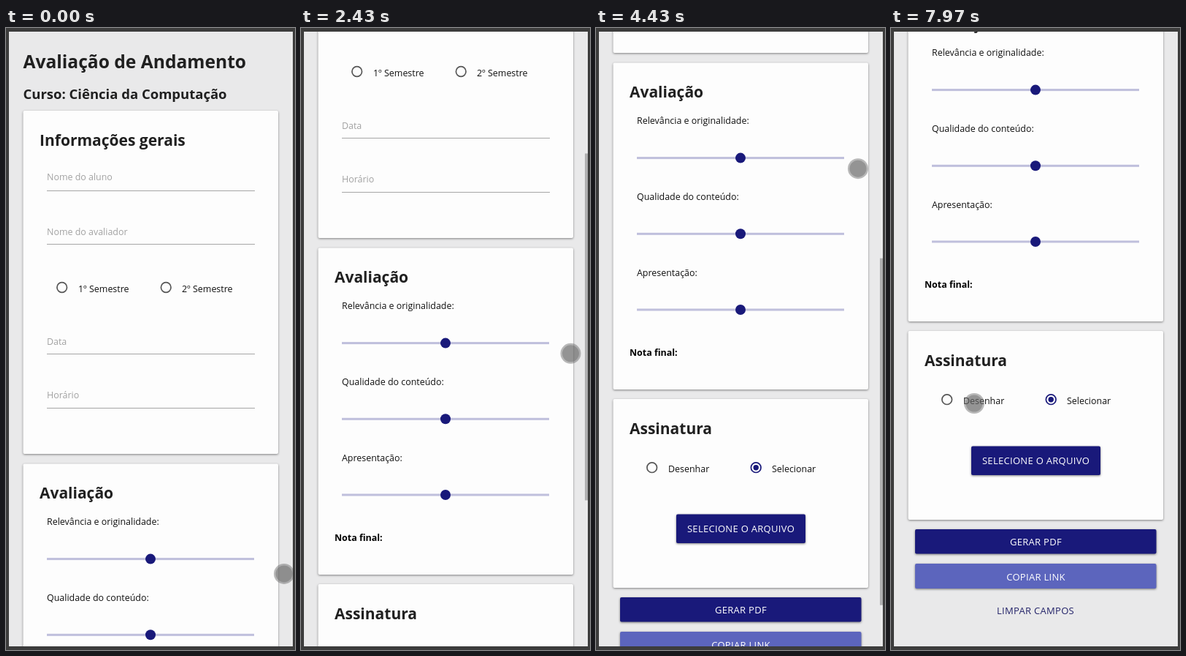
These frames come from a looping animation (396x850 px, 8000 ms). An HTML page:

```html
<!DOCTYPE html>
<html lang="pt-BR">
<head>
<meta charset="utf-8">
<title>Avaliação de Andamento</title>
<style>
  html, body { margin: 0; width: 100%; height: 100%; overflow: hidden; background: #e9e9ea; }
  svg { display: block; width: 100%; height: 100%; }
  text { font: 12.45px "Open Sans", "Noto Sans", sans-serif; fill: #111; }
  .title, .course, .heading, .strong { font-weight: 700; fill: #202020; }
  .title { font-size: 24.6px; }
  .course { font-size: 18.5px; }
  .heading { font-size: 21px; }
  .strong { fill: #000; }
  .hint { fill: #a2a2a2; }
  .caps { font-size: 13px; fill: #fff; letter-spacing: .3px; text-anchor: middle; }
  .flat { fill: #24246a; }
  .card { fill: #fdfdfd; filter: drop-shadow(0 1px 1.5px rgba(0, 0, 0, .45)); }
  .button { fill: #19197a; filter: drop-shadow(0 1px 1.5px rgba(0, 0, 0, .5)); }
  .soft { fill: #5c65bd; }
  .underline { stroke: #a6a6a6; fill: none; }
  .radio { fill: none; stroke: #575757; stroke-width: 1.7; }
  .on { stroke: #19197a; }
  .navy { fill: #19197a; }
</style>
</head>
<body>
<svg viewBox="0 0 396 850">
  <defs>
    <g id="slider">
      <rect x="56" y="-1.5" width="284" height="3" fill="#bfbfdc"/>
      <circle class="navy" cx="198" r="7"/>
    </g>
  </defs>
  <rect width="396" height="850" fill="#e9e9ea"/>

  <g id="page">
    <text class="title" x="23.5" y="55">Avaliação de Andamento</text>
    <text class="course" x="23.5" y="97">Curso: Ciência da Computação</text>

    <rect class="card" x="23.5" y="113" width="349.5" height="469" rx="2"/>
    <text class="heading" x="46" y="161">Informações gerais</text>
    <text class="hint" x="56" y="208">Nome do aluno</text>
    <text class="hint" x="56" y="283">Nome do avaliador</text>
    <text class="hint" x="56" y="433">Data</text>
    <text class="hint" x="56" y="506">Horário</text>
    <path class="underline" d="M56 222.5h285M56 295.5h285M56 445.5h285M56 519.5h285"/>
    <circle class="radio" cx="76.7" cy="354.5" r="6.8"/>
    <text x="99" y="361">1º Semestre</text>
    <circle class="radio" cx="219.2" cy="354.5" r="6.8"/>
    <text x="241" y="361">2º Semestre</text>

    <rect class="card" x="23.5" y="595.5" width="349.5" height="446.5" rx="2"/>
    <text class="heading" x="46" y="643">Avaliação</text>
    <text x="56" y="679">Relevância e originalidade:</text>
    <use href="#slider" y="725.6"/>
    <text x="56" y="783">Qualidade do conteúdo:</text>
    <use href="#slider" y="829.3"/>
    <text x="56" y="887">Apresentação:</text>
    <use href="#slider" y="933"/>
    <text class="strong" x="46" y="996">Nota final:</text>

    <rect class="card" x="23.5" y="1055" width="349.5" height="258" rx="2"/>
    <text class="heading" x="46" y="1103">Assinatura</text>
    <circle class="radio" cx="76.7" cy="1148.7" r="6.8"/>
    <text x="99" y="1155">Desenhar</text>
    <circle class="radio on" cx="219.2" cy="1148.7" r="6.8"/>
    <circle class="navy" cx="219.2" cy="1148.7" r="3.7"/>
    <text x="241" y="1155">Selecionar</text>
    <rect class="button" x="110" y="1212.5" width="177" height="39.5" rx="2"/>
    <text class="caps" x="198.5" y="1237">SELECIONE O ARQUIVO</text>

    <rect class="button" x="33" y="1326" width="330.5" height="33.5" rx="2"/>
    <text class="caps" x="198.5" y="1348">GERAR PDF</text>
    <rect class="button soft" x="33" y="1373" width="330.5" height="34" rx="2"/>
    <text class="caps" x="198.5" y="1396">COPIAR LINK</text>
    <text class="caps flat" x="198" y="1442">LIMPAR CAMPOS</text>
  </g>

  <rect id="bar" x="389" width="4" height="474" fill="#585858" fill-opacity=".4"/>
  <g id="touch">
    <circle r="14" fill="#6c6c6c" fill-opacity=".48"/>
    <circle r="11.5" fill="#5e5e5e" fill-opacity=".4"/>
  </g>
  <path d="M0 0H396V850H0ZM4 5V845H393V5Z" fill="#3c3c3c" fill-rule="evenodd"/>
</svg>
<script>
  const LOOP = 8000, MAX_SCROLL = 641, DRAG_START = 740;
  const DRAG_END = 5400, MOVE_START = 6650;
  // time, x, y of the touch point
  const path = [
    [0, 381, 746], [1730, 374, 537], [3130, 365, 353], [3970, 359, 245],
    [4930, 359, 135], [DRAG_END, 359, 82], [MOVE_START, 359, 82], [7500, 114, 513], [LOOP, 114, 513]
  ];
  const page = document.getElementById('page');
  const bar = document.getElementById('bar');
  const touch = document.getElementById('touch');
  const clamp = (v, lo, hi) => Math.min(hi, Math.max(lo, v));

  function touchAt(time) {
    const i = path.findIndex(p => p[0] > time);
    const [t0, x0, y0] = path[i - 1], [t1, x1, y1] = path[i];
    let k = (time - t0) / (t1 - t0);
    if (t0 === MOVE_START) k = k * k * (3 - 2 * k);
    return [x0 + (x1 - x0) * k, y0 + (y1 - y0) * k];
  }

  function draw(now) {
    const time = now % LOOP;
    const [x, y] = touchAt(time);
    const scroll = time > DRAG_END ? MAX_SCROLL : clamp(Math.round(DRAG_START - y), 0, MAX_SCROLL);
    page.setAttribute('transform', `translate(0 ${-scroll})`);
    touch.setAttribute('transform', `translate(${x} ${y})`);
    bar.setAttribute('y', 4.5 + scroll * .566);
    bar.setAttribute('opacity', scroll > 0 ? clamp((5800 - time) / 250, 0, 1) : 0);
  }

  const start = performance.now();
  function tick() {
    draw(performance.now() - start);
    requestAnimationFrame(tick);
  }
  tick();
</script>
</body>
</html>
```
